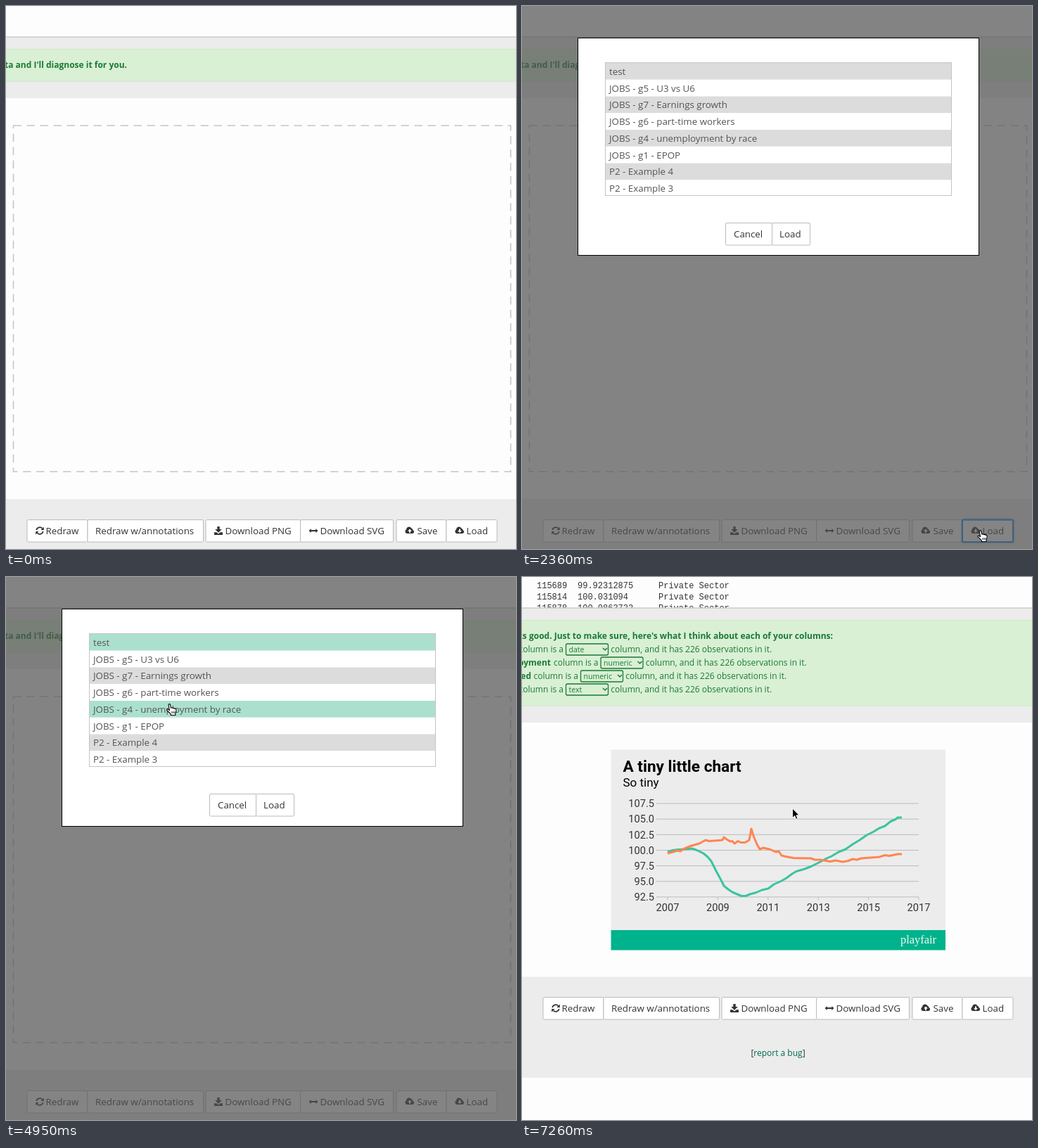
Animation of 725 by 772 pixels, one loop 8000 ms. Source, as an HTML page:

```html
<!DOCTYPE html>
<html lang="en">
<head>
<meta charset="utf-8">
<title>Chart builder</title>
<style>
  html, body { margin: 0; width: 100%; height: 100%; overflow: hidden; background: #fdfdfd; }
  svg { display: block; width: 725px; height: 772px; font: 13.33px "Open Sans", sans-serif; }
  .button rect { fill: #fff; stroke: #bbb; }
  .button text, .icon { fill: #333; }
  .arc { fill: none; stroke: #333; stroke-width: 1.8; }
  .hover rect { fill: #3bc4a0; }
  .hover text, .hover .icon, .press .icon { fill: #fff; }
  .press rect { fill: #d0d0d0; }
  .focus rect { stroke: #2383e2; stroke-width: 2; filter: drop-shadow(0 0 1.5px #4aa5f5); }
  .notice { font-size: 12px; fill: #1b7a33; }
  .bold { font-weight: 700; }
  .mono { font: 12px "Liberation Mono", monospace; fill: #333; }
  .chart { font: 14.6px Roboto, sans-serif; fill: #333; }
  .line { fill: none; stroke-width: 3; stroke-linejoin: round; stroke-linecap: butt; }
  .row text { fill: #555; }
</style>
</head>
<body>
<svg id="stage" viewBox="0 0 725 772"></svg>
<script>
const LOOP = 8000, ROW_TOP = 81, ROW_HEIGHT = 23.75;

const rect = (x, y, w, h, fill, extra = '') =>
  `<rect x="${x}" y="${y}" width="${w}" height="${h}" fill="${fill}" ${extra}/>`;
const text = (x, y, label, extra = '') => `<text x="${x}" y="${y}" ${extra}>${label}</text>`;
const endText = (x, y, label, extra = '') => text(x, y, label, `text-anchor="end" ${extra}`);

const cloud = 'M3 10A3 3 0 0 1 2.1 4.3A4 4 0 0 1 9.8 3A2.6 2.6 0 0 1 11.6 5.2A2.5 2.5 0 0 1 11 10Z';
const icons = {
  refresh: 'M11.8 .6V5H7.4ZM.2 11.4V7H4.6Z',
  download: 'M4.3 0H7.7V4H10.8L6 8.8 1.2 4H4.3ZM0 8.2H3.4L6 10.6 8.6 8.2H12V12H0Z',
  wide: 'M0 6L3.2 3V5.1H9.8V3L13 6 9.8 9V6.9H3.2V9Z',
  upload: cloud + 'M7 3.6L10 6.6H8V9H6V6.6H4Z',
  fetch: cloud + 'M7 9L4 6H6V3.6H8V6H10Z'
};

function button(x, y, width, label, labelX, icon, id = '') {
  const arcs = icon === 'refresh'
    ? '<path class="arc" d="M1.2 5A5 5 0 0 1 9.6 2.6M10.8 7A5 5 0 0 1 2.4 9.4"/>' : '';
  const mark = icon
    ? `<g transform="translate(${x + 12} ${y + 9.5})">${arcs}<path class="icon" fill-rule="evenodd" d="${icons[icon]}"/></g>` : '';
  return `<g class="button" id="${id}">${rect(x, y, width, 31.5, '', 'rx="1.5"')}${mark}${text(labelX, y + 20.5, label)}</g>`;
}

const toolbar = [
  button(30, 730.5, 86, 'Redraw', 56.5, 'refresh'),
  button(116, 730.5, 164.5, 'Redraw w/annotations', 127, ''),
  button(284, 730.5, 134.5, 'Download PNG', 311.5, 'download'),
  button(418.5, 730.5, 132, 'Download SVG', 446.5, 'wide'),
  button(555, 730.5, 71, 'Save', 584.5, 'upload'),
  button(626, 730.5, 72, 'Load', 654.5, 'fetch', 'pageLoad')
].join('');

const panels = (noticeHeight, grayEnd, whiteEnd, footEnd) =>
  rect(0, 44, 725, grayEnd - 44, '#ececec') + rect(0, 43.5, 725, 1, '#b8b8b8') +
  rect(-2, 61.5, 729, noticeHeight, '#d9f0d5', 'stroke="#cfe8c9"') +
  rect(0, whiteEnd, 725, footEnd - whiteEnd, '#ececec');

const emptyPage = panels(45.5, 131, 701, 780) +
  endText(172, 88, "Paste in some data and I'll diagnose it for you.", 'class="notice bold"') +
  rect(10.5, 170, 707, 492, 'none', 'stroke="#c6c6c6" stroke-width="1.6" stroke-dasharray="11.4 7.6"');

function columnNote(y, name, nameEnd, type, boxX) {
  const chevron = `<path d="M${boxX + 53} ${y - 5.5}l3 3 3-3" fill="none" stroke="#1b7a33" stroke-width="1.5"/>`;
  return endText(nameEnd, y, name, 'class="bold"') + endText(boxX - 3, y, 'column is a') +
    rect(boxX + .5, y - 11.5, 60, 16, 'none', 'rx="2" stroke="#1b7a33" stroke-width="1.3"') +
    text(boxX + 4.5, y, type, 'font-size="10.5"') + chevron +
    text(boxX + 64.3, y, 'column, and it has 226 observations in it.');
}

const teal = `207,391 214,388.5 222,387.5 232,387 242,386 250,389 258,393 264,398 269,404 276,418 282,429
  287,439 293,444 299,448 306,451 312,453.5 318,453.5 324,451 333,448.5 341,445 350,443 358,437 368,432.5
  376,428 384,422 390,418.5 402,415 412,411 422,406 432,400.5 440,397 450,391 460,387 470,380 480,374
  490,367 500,362 508,357 516,354 524,347.5 531,344.5 534,342 540,342`;
const orange = `207,393 214,391 221,389 225,390 230,386.5 241,382 252,379 261,374 266,375.5 285,374 287,370
  291,373 296,376 299,375.5 302,379 307,375.5 311,377.5 317,377.5 323,374 326,358 329,368 334,380 338,387
  343,385 352,387 361,391 365,390 369,396 375,397.5 386,399.5 411,400 416,402 424,402 438,404.5 446,403
  456,405 464,403.5 470,401 476,402 482,400 508,398 516,395.5 522,396.5 534,394 540,394`;

let axes = '';
for (let i = 0; i < 7; i++) {
  const y = 322 + i * 22.15;
  axes += rect(191, y - .5, 373, 1, '#bbb') + endText(188, y + 5.2, (107.5 - i * 2.5).toFixed(1));
}
for (let i = 0; i < 6; i++) {
  const x = 207 + i * 71.4;
  axes += rect(x - .5, 455, 1, 4, '#bbb') + text(x, 475, 2007 + i * 2, 'text-anchor="middle"');
}

const dataRows = [['115689', '99.92312875'], ['115814', '100.031094'], ['115878', '100.0863722']]
  .map(([id, value], i) => {
    const y = 16 + i * 16;
    return text(21, y, id) + text(79, y, value) + text(194, y, 'Private Sector');
  }).join('');

const chartPage = `<g class="mono" clip-path="url(#dataClip)">${dataRows}</g>` +
  panels(121.5, 207, 568.5, 712) +
  `<g class="notice">` +
  endText(442, 88, "Looks good. Just to make sure, here's what I think about each of your columns:", 'class="bold"') +
  columnNote(106.5, 'date', -8, 'date', 62) + columnNote(125.5, 'employment', 41, 'numeric', 111.5) +
  columnNote(144.5, 'indexed', 13, 'numeric', 83) + columnNote(163.5, 'type', -8, 'text', 62) + '</g>' +
  `<g class="chart">${rect(126.5, 245.5, 475.5, 257, '#ececec')}${rect(126.5, 502, 475.5, 28.5, '#00b38c')}` +
  text(143.5, 276.5, 'A tiny little chart', 'font-size="22.6" font-weight="700" fill="#000"') +
  text(143.5, 298, 'So tiny', 'font-size="17" fill="#000"') + axes +
  `<polyline class="line" stroke="#3bc4a0" points="${teal}"/><polyline class="line" stroke="#ff8552" points="${orange}"/>` +
  endText(589, 520.5, 'playfair', 'font-size="16.4" fill="#eef8f5" style="font-family:\'Liberation Serif\',serif"') + '</g>' +
  text(364, 681, '[<tspan fill="#00694f">report a bug</tspan>]', 'font-size="12" fill="#333" text-anchor="middle"');

const rowNames = ['test', 'JOBS - g5 - U3 vs U6', 'JOBS - g7 - Earnings growth', 'JOBS - g6 - part-time workers',
  'JOBS - g4 - unemployment by race', 'JOBS - g1 - EPOP', 'P2 - Example 4', 'P2 - Example 3'];
const rows = rowNames.map((name, i) => {
  const y = ROW_TOP + i * ROW_HEIGHT;
  return `<g class="row">${rect(119, y, 491, ROW_HEIGHT, '#fff')}${text(124, y + 16.8, name)}</g>`;
}).join('');

const stage = document.getElementById('stage');
stage.innerHTML = `
  <clipPath id="dataClip">${rect(0, 0, 725, 43.5, '#000')}</clipPath>
  <clipPath id="listClip">${rect(118, 80, 493, 189.5, '#000')}</clipPath>
  ${rect(0, 0, 725, 772, '#fdfdfd')}
  <g id="page"><g id="emptyPage">${emptyPage}</g><g id="chartPage">${chartPage}</g><g id="toolbar">${toolbar}</g></g>
  <g id="modal">
    ${rect(0, 0, 725, 772, '#505050', 'opacity=".7"')}
    ${rect(79.5, 45.5, 570, 309, '#fff', 'id="dialog" stroke="#000"')}
    <g id="list"><g clip-path="url(#listClip)">${rows}</g>
      ${rect(118.5, 80.5, 492, 189, 'none', 'stroke="#c4c4c4"')}
      ${rect(598, 83, 6.5, 110, '#6a6a6a', 'id="scrollbar" rx="3.2"')}</g>
    ${rect(118, 80, 493, 1.6, '#c4c4c4', 'id="emptyList"')}
    <g id="dialogButtons">${button(289.5, 308.5, 66, 'Cancel', 301, '')}${button(355.5, 308.5, 54, 'Load', 366, '', 'dialogLoad')}</g>
  </g>
  <g id="cursor">
    <g id="hand" fill="#fff" stroke="#000" stroke-width="1.1" stroke-linejoin="round">
      <path d="M3.2 1.8C3 .4 5.3 .2 5.7 1.6L6.8 6.2C8 5.4 9 5.8 9.3 6.6 10.3 6 11.4 6.4 11.7 7.3 12.8 6.8 14 7.4 14.1 8.6 14.4 11 13.8 12.4 13 14V16.5H6.4V15C5 13.2 3.4 11.6 1 9.6 .2 8.6 1.4 7.6 2.6 8.2L4.6 9.6Z"/>
      <path d="M8 11v3M10 11v3M11.9 11v3" stroke-width=".8"/>
    </g>
    <path id="arrow" d="M.5 0V13.5L3.7 10.6 5.7 15.2 7.9 14.2 5.9 9.8H10.1Z" stroke="#fff" stroke-width=".9"/>
  </g>`;

const el = id => document.getElementById(id);
const show = (id, on) => { el(id).style.display = on ? '' : 'none'; };
const shiftY = (id, y) => el(id).setAttribute('transform', `translate(0 ${y})`);
const rowBoxes = [...document.querySelectorAll('.row rect')];

// Each pointer move is sampled in a few held steps.
const moves = [
  { start: 990, end: 1400, steps: 5, from: [728, 718], to: [647, 745] },
  { start: 2980, end: 3190, steps: 3, from: [647, 745], to: [190, 162] },
  { start: 3360, end: 3710, steps: 5, from: [190, 162], to: [143, 99] },
  { start: 4690, end: 5470, steps: 10, from: [143, 99], to: [384, 329] }
];

function pointerAt(t) {
  const move = moves.filter(m => t >= m.start).pop();
  if (!move) return null;
  const interval = (move.end - move.start) / (move.steps - 1);
  const step = Math.min(move.steps, Math.floor((t - move.start) / interval + 1e-6) + 1);
  const u = step / move.steps, p = u * u * (3 - 2 * u);
  return move.from.map((v, i) => v + (move.to[i] - v) * p);
}

const inside = (x, y, left, top, right, bottom) => x >= left && x <= right && y >= top && y <= bottom;

function setButton(id, hover, press, focus) {
  el(id).setAttribute('class', `button${press ? ' press' : hover ? ' hover' : ''}${focus ? ' focus' : ''}`);
}

function draw(t) {
  const loaded = t >= 7170, open = t >= 2240 && t < 7260, listed = t >= 2360 && !loaded;
  const pointer = pointerAt(t);
  const x = pointer ? pointer[0] + 4 : -1, y = pointer ? pointer[1] + 1 : -1;
  const overPageLoad = t < 2980 && inside(x, y, 626, 730, 698, 762);
  const overRows = listed && inside(x, y, 119, ROW_TOP, 610, 269);
  const overDialogLoad = listed && inside(x, y, 355, 308, 410, 340);

  show('emptyPage', !loaded);
  show('chartPage', loaded);
  shiftY('page', t >= 2030 && t < 2120 ? -2 : 0);
  shiftY('toolbar', loaded ? -133 : 0);
  setButton('pageLoad', overPageLoad && t < 2240, t >= 2030 && t < 2120, t >= 2030 && t < 3980);

  show('modal', open);
  show('list', listed);
  show('emptyList', !listed);
  el('dialog').setAttribute('height', listed ? 309 : 121);
  shiftY('dialogButtons', listed ? 0 : -188);
  setButton('dialogLoad', overDialogLoad || loaded, t >= 5560 && t < 5740, t >= 5560);

  const hovered = overRows ? Math.floor((y - ROW_TOP) / ROW_HEIGHT) : -1;
  const selected = t >= 3980 && t < 5560 ? 0 : -1;
  rowBoxes.forEach((box, i) =>
    box.setAttribute('fill', i === hovered || i === selected ? '#abe0cf' : i % 2 ? '#fff' : '#dcdcdc'));
  el('scrollbar').setAttribute('opacity', t < 3980 ? 0 : Math.max(0, Math.min(1, (4900 - t) / 210)));

  const hand = t < 6630 && (overPageLoad || overRows || overDialogLoad);
  show('cursor', pointer);
  show('hand', hand);
  show('arrow', !hand);
  if (pointer) el('cursor').setAttribute('transform', `translate(${pointer})`);
}

function tick() {
  draw(performance.now() % LOOP);
  requestAnimationFrame(tick);
}
tick();
</script>
</body>
</html>
```
